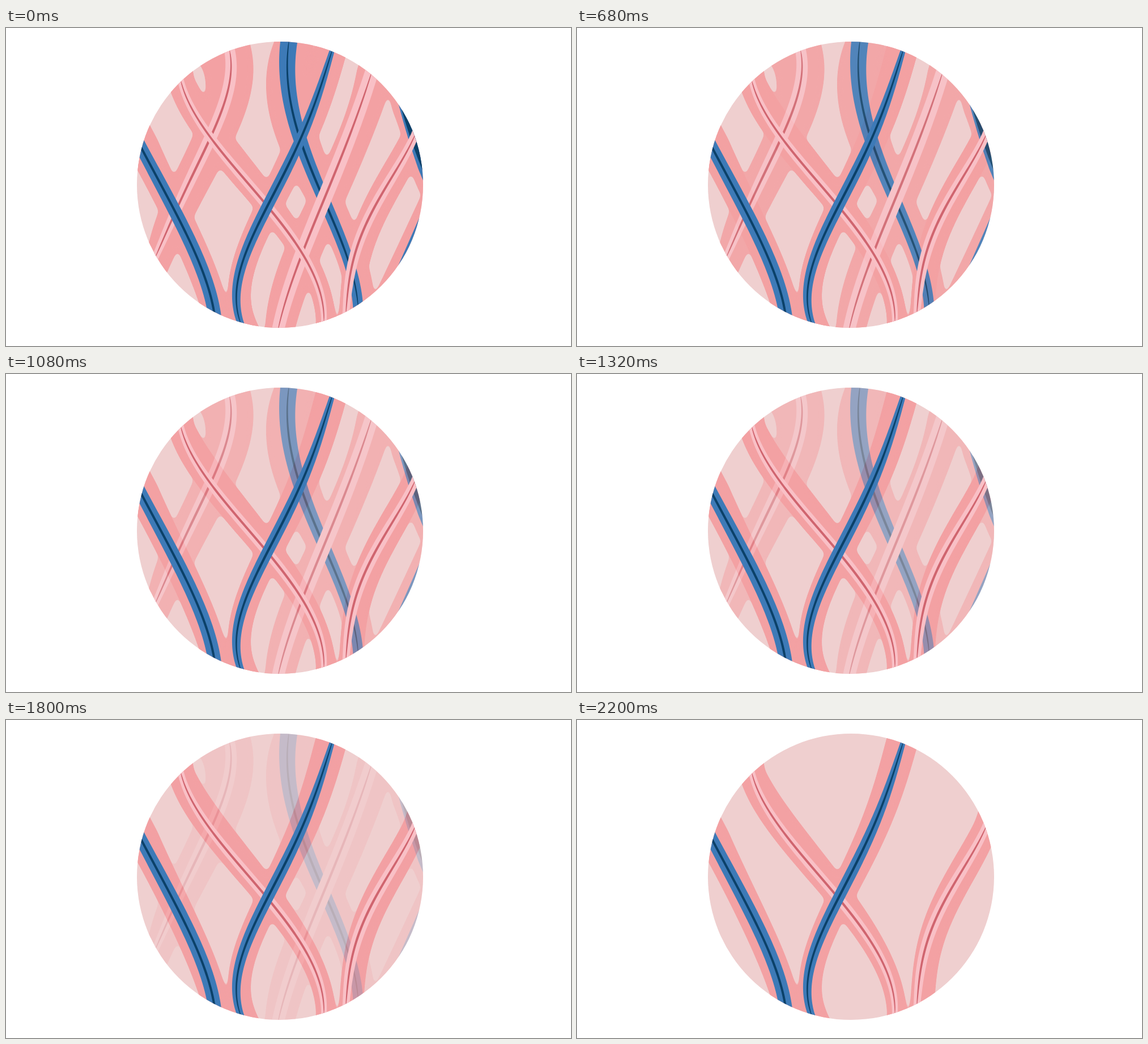
These frames come from a looping animation (997 px wide and 561 px high, 5000 ms). An HTML page:

```html
<!DOCTYPE html>
<html lang="en">
<head>
<meta charset="utf-8">
<title>Crossing fibres</title>
<style>
html, body { margin: 0; width: 100%; height: 100%; overflow: hidden; background: #fff; }
svg { display: block; width: 997px; height: 561px; }
</style>
</head>
<body>
<svg viewBox="0 0 997 561">
  <clipPath id="lens"><circle cx="483.5" cy="276.5" r="252.5"/></clipPath>
  <!-- Blur and sharpen again: fills the corners where tissue meets -->
  <filter id="fuse" filterUnits="userSpaceOnUse" x="190" y="-20" width="590" height="600" color-interpolation-filters="sRGB">
    <feGaussianBlur stdDeviation="5"/>
    <feColorMatrix values="1 0 0 0 0  0 1 0 0 0  0 0 1 0 0  0 0 0 14 -6.5"/>
  </filter>
  <g clip-path="url(#lens)">
    <rect width="997" height="561" fill="#efcfcf"/>
    <g id="tissue" filter="url(#fuse)"></g>
    <g id="fading">
      <g id="fadingTissue" filter="url(#fuse)"></g>
      <g id="fadingVeins"></g>
    </g>
    <g id="veins"></g>
  </g>
</svg>
<script>
const TISSUE = '#f3a1a3';
const BLUE = { vein: '#3d7ab7', core: '#0b4169' };
const PINK = { vein: '#f9c0c6', core: '#d0656f' };
const layer = id => document.getElementById(id);
const fading = layer('fading');

// Value at t of the polynomial through the points (ts[i], vs[i]).
const through = (ts, vs, t) => vs.reduce((sum, v, i) =>
  sum + ts.reduce((p, s, j) => j == i ? p : p * (t - s) / (ts[i] - s), v), 0);

// Value at u in 0..1 of a curve through evenly spaced values.
const spread = (vs, u) => through(vs.map((_, i) => i / (vs.length - 1)), vs, u);

// Ribbon along x(y); left and right give the distance from the line at u.
function ribbon(parent, fill, line, left, right) {
  const xs = line.map(p => p[0]), ys = line.map(p => p[1]);
  const top = ys[0], bottom = ys.at(-1), a = [], b = [];
  for (let y = top - 40; y <= bottom + 40; y += 4) {
    const x = through(ys, xs, y), slope = through(ys, xs, y + .5) - through(ys, xs, y - .5);
    const u = Math.max(0, Math.min(1, (y - top) / (bottom - top)));
    const cos = 1 / Math.hypot(1, slope), sin = slope * cos;
    const l = left(u), r = right(u);
    a.push([x - l * cos, y + l * sin]);
    b.unshift([x + r * cos, y - r * sin]);
  }
  const path = document.createElementNS('http://www.w3.org/2000/svg', 'path');
  path.setAttribute('fill', fill);
  path.setAttribute('d', 'M' + a.concat(b).join('L') + 'Z');
  layer(parent).append(path);
}

// line: key points; half: vein half widths; left, right: tissue reach; all from top to bottom.
function strand({ line, color, half, left, right, fades, coreHalf }) {
  const along = vs => u => spread(vs, u);
  const core = coreHalf ? () => coreHalf : u => .5 + 1.6 * Math.sqrt(Math.sin(Math.PI * u));
  const veins = fades ? 'fadingVeins' : 'veins';
  for (const id of fades ? ['fadingTissue'] : ['tissue', 'fadingTissue'])
    ribbon(id, TISSUE, line, along(left), along(right));
  ribbon(veins, color.vein, line, along(half), along(half));
  ribbon(veins, color.core, line, core, core);
}

// Strands that fade away
strand({ fades: true, color: PINK, half: [9.5, 10.5, 6], left: [65, 32, 29, 18], right: [38, 40, 35, 30],
  line: [[395, 42], [389, 120], [353, 210], [311, 298], [265, 401]] });
strand({ fades: true, color: BLUE, half: [15, 11, 9], left: [25, 40, 24, 24], right: [42, 33, 32, 30],
  line: [[499, 25], [504, 140], [547, 270], [597, 390], [621, 488]] });
strand({ fades: true, color: PINK, half: [12, 13, 11], left: [26, 22, 31, 24], right: [40, 37, 33, 29],
  line: [[644, 82], [613, 172], [563, 298], [518, 410], [481, 528]] });
strand({ fades: true, color: BLUE, half: [9, 10, 12], left: [22, 20, 26], right: [30, 30], coreHalf: 6,
  line: [[704, 142], [717, 185], [739, 245]] });
strand({ fades: true, color: BLUE, half: [15, 15], left: [28, 32], right: [40, 40], coreHalf: .1,
  line: [[756, 311], [724, 384], [683, 476]] });

// Strands that stay
strand({ color: PINK, half: [5.5, 8.5, 5], left: [23, 20, 19, 14], right: [24, 32, 22, 21],
  line: [[309, 95], [366, 200], [456, 308], [526, 403], [561, 515]] });
strand({ color: BLUE, half: [4.5, 10, 6], left: [30, 24, 19, 13], right: [26, 27, 25, 27],
  line: [[575, 41], [546, 130], [500, 238], [441, 355], [413, 518]] });
strand({ color: BLUE, half: [10.5, 11.5, 11.5], left: [25, 25, 26, 21], right: [32, 26, 24, 26], coreHalf: 2,
  line: [[239, 212], [271, 272], [302, 331], [338, 407], [367, 500]] });
strand({ color: PINK, half: [7, 9.5, 6], left: [22, 22, 16, 12], right: [22, 27, 29, 31],
  line: [[721, 190], [681, 263], [644, 328], [614, 405], [600, 500]] });

function frame(now) {
  const step = Math.floor((now % 5000 - 480) / 40);
  fading.setAttribute('opacity', 1 - Math.max(0, Math.min(43, step)) / 43);
  requestAnimationFrame(frame);
}
frame(0);
</script>
</body>
</html>
```
